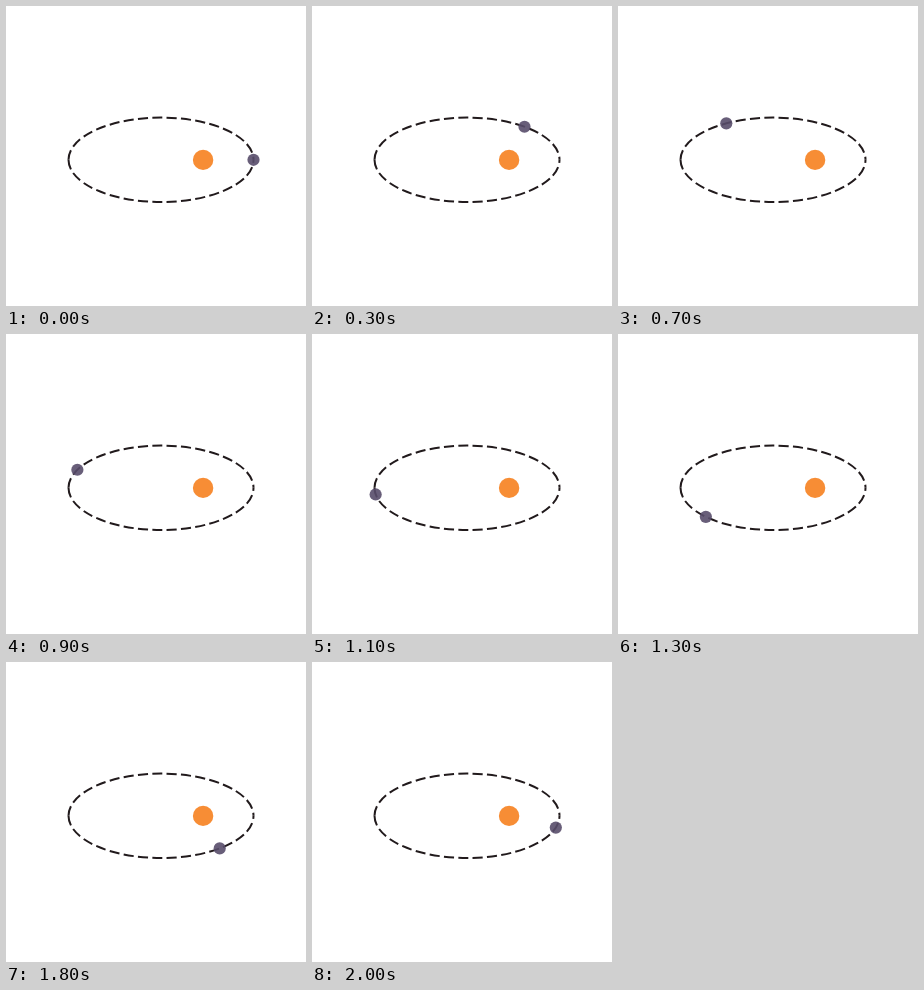
Animation, 300 px wide and 300 px high, one loop 2100 ms. Source, as an HTML page with a canvas:

```html
<!DOCTYPE html>
<html lang="en">
<head>
<meta charset="utf-8">
<title>Elliptical orbit</title>
<style>
html, body { margin: 0; width: 100%; height: 100%; overflow: hidden; background: #fff; }
canvas { display: block; width: 300px; height: 300px; }
</style>
</head>
<body>
<canvas id="stage"></canvas>
<script>
const canvas = document.getElementById('stage');
const ratio = window.devicePixelRatio || 1;
canvas.width = canvas.height = 300 * ratio;
const ctx = canvas.getContext('2d');

const STEP = 100, STEPS = 21, TURN = 0.3; // ms, count, radians per step
const orbit = { x: 155, y: 153.8, rx: 92.5, ry: 42.2 };

function disc(x, y, r, color) {
  ctx.fillStyle = color;
  ctx.beginPath();
  ctx.arc(x, y, r, 0, Math.PI * 2);
  ctx.fill();
}

// Half of the orbit, dashed from the left end to the right end.
function halfOrbit(side) {
  ctx.save();
  ctx.translate(orbit.x, orbit.y);
  ctx.scale(1, side);
  ctx.beginPath();
  ctx.ellipse(0, 0, orbit.rx, orbit.ry, 0, Math.PI, Math.PI * 2);
  ctx.strokeStyle = '#211a1c';
  ctx.lineWidth = 2;
  ctx.setLineDash([10.1, 4.27]);
  ctx.stroke();
  ctx.restore();
}

function draw(now) {
  const angle = Math.floor(now / STEP) % STEPS * TURN;
  ctx.setTransform(ratio, 0, 0, ratio, 0, 0);
  ctx.fillStyle = '#fff';
  ctx.fillRect(0, 0, 300, 300);
  halfOrbit(1);
  halfOrbit(-1);
  disc(197.1, 153.9, 10.2, '#f78d35');
  disc(orbit.x + orbit.rx * Math.cos(angle),
       orbit.y - orbit.ry * Math.sin(angle), 6.1, 'rgba(88, 77, 106, 0.9)');
}

const start = performance.now();
function tick() {
  draw(performance.now() - start);
  requestAnimationFrame(tick);
}
tick();
</script>
</body>
</html>
```
